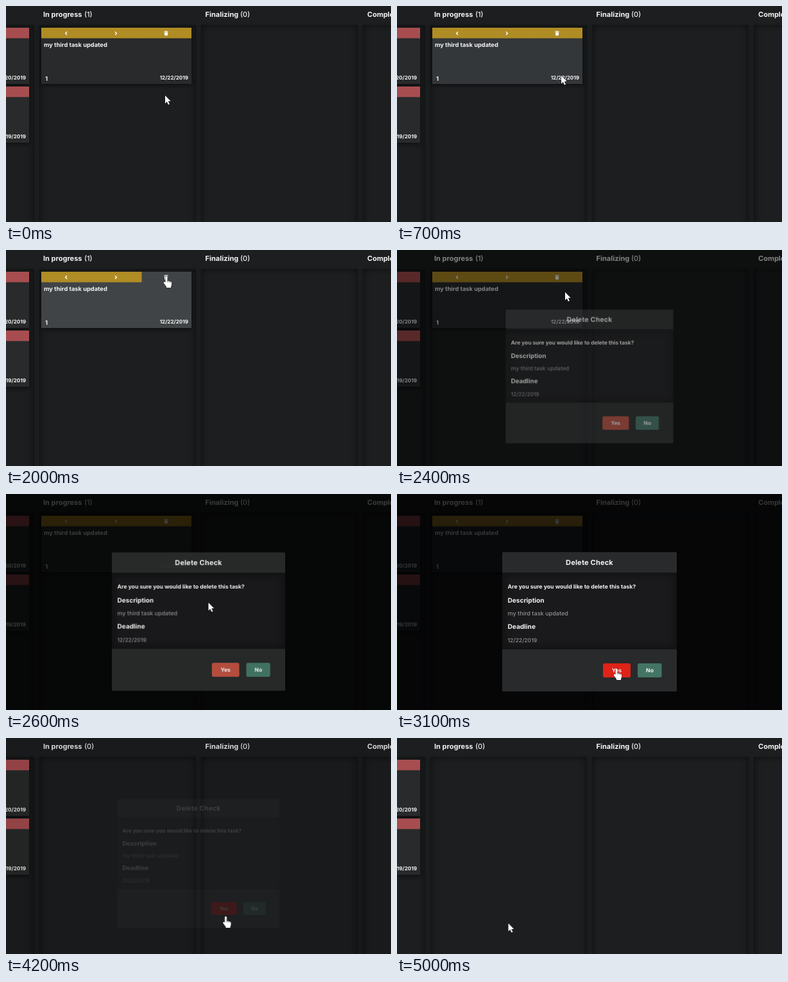
Animation of 600x338 px, one loop 5100 ms. Source, as an HTML page:

```html
<!DOCTYPE html>
<html lang="en">
<head>
<meta charset="utf-8">
<title>Task board</title>
<style>
  html, body { margin: 0; width: 100%; height: 100%; overflow: hidden; background: #1c1e1f; }
  .board { position: relative; width: 100%; height: 100%; overflow: hidden; contain: strict; }
  .column {
    position: absolute; top: 30px; width: 244px; height: 340px;
    background: #1c1e1f;
    box-shadow: inset 0 0 11px rgba(0, 0, 0, .55), 0 0 4px rgba(0, 0, 0, .25);
  }
  .stage { position: absolute; left: 0; top: 0; overflow: hidden; }
  text { font-family: Inter, "Open Sans", sans-serif; font-weight: 700; fill: #f4f4f4; text-rendering: geometricPrecision; }
  .title { font-size: 11px; }
  .title .count { font-weight: 500; }
  .task { font-size: 9.3px; }
  .date { font-size: 8.1px; text-anchor: end; }
  .card { filter: drop-shadow(0 2px 3px rgba(0, 0, 0, .55)); }
  .surface { fill: #282a2b; }
  .gold { fill: #b08c25; }
  .red { fill: #a74d50; }
  .chevron { fill: none; stroke: #fff; stroke-width: 1.3; }
  .icon { fill: #fff; }
  .head { font-size: 11px; letter-spacing: .2px; text-anchor: middle; }
  .ask { font-size: 8.75px; }
  .label { font-size: 10.1px; }
  .value { font-size: 9.1px; font-weight: 500; fill: #909193; }
  .button { font-size: 8.6px; text-anchor: middle; }
  .pointer { fill: #fff; stroke: #111; stroke-width: .8; paint-order: stroke; }

  /* 5.1 s loop on a 0.1 s grid (1.96% per tick) */
  .anim { animation: 5.1s step-end infinite; }
  .cursor { animation-name: move; }
  .hand { animation-name: hand; }
  .arrow { animation-name: arrow; }
  .hover { animation-name: hover; }
  .bin { animation-name: bin; }
  .full { animation-name: full; }
  .empty { animation-name: empty; }
  .modal { animation-name: fade; }
  .dialog { animation-name: zoom; transform-origin: 300px 146px; }
  .yes { animation-name: yes; }

  @keyframes move {
    0% { transform: translate(248px, 140px); }
    11.76% { transform: translate(251px, 130px); }
    13.72% { transform: translate(256px, 109px); }
    15.68% { transform: translate(262px, 82px); }
    17.64% { transform: translate(266px, 60px); }
    19.6% { transform: translate(268px, 49px); }
    21.56% { transform: translate(268.5px, 46px); }
    27.45% { transform: translate(268.5px, 46px); animation-timing-function: steps(6); }
    39.21% { transform: translate(250px, 41px); }
    47.05% { transform: translate(262px, 66px); }
    49.01% { transform: translate(291px, 124px); }
    50.98% { transform: translate(315.5px, 170px); }
    52.94% { transform: translate(323px, 196px); }
    54.9% { transform: translate(330px, 223px); }
    56.86% { transform: translate(335px, 245px); }
    58.82% { transform: translate(339px, 261px); }
    60.78% { transform: translate(342px, 273px); }
    62.74% { transform: translate(344px, 281px); }
    64.7% { transform: translate(345px, 285px); }
    66.66% { transform: translate(345px, 286px); }
    68.62% { transform: translate(343px, 281px); }
    70.58% { transform: translate(342.5px, 277px); }
    82.35% { transform: translate(342.5px, 279px); }
    84.31% { transform: translate(322px, 284px); }
    86.27% { transform: translate(272px, 289px); }
    88.23% { transform: translate(212px, 291px); }
    90.19%, 100% { transform: translate(173.5px, 290px); }
  }
  @keyframes hand {
    0%, 47.05%, 84.31%, 100% { opacity: 0; }
    19.6%, 60.78% { opacity: 1; }
  }
  @keyframes arrow {
    0%, 47.05%, 84.31%, 100% { opacity: 1; }
    19.6%, 60.78% { opacity: 0; }
  }
  @keyframes hover {
    0%, 47.05%, 100% { fill: #282a2b; }
    13.72% { fill: #34373a; }
    15.68% { fill: #404446; }
  }
  @keyframes bin {
    0%, 47.05%, 100% { opacity: 1; }
    19.6% { opacity: 0; }
  }
  @keyframes full {
    0% { opacity: 1; }
    80.39%, 100% { opacity: 0; }
  }
  @keyframes empty {
    0% { opacity: 0; }
    80.39%, 100% { opacity: 1; }
  }
  @keyframes fade {
    0%, 84.31%, 100% { opacity: 0; }
    45.09%, 82.35% { opacity: .15; }
    47.05% { opacity: .6; }
    49.01% { opacity: .9; }
    50.98% { opacity: .98; }
    52.94% { opacity: 1; }
    80.39% { opacity: .55; }
  }
  @keyframes zoom {
    0%, 45.09%, 82.35%, 100% { transform: scale(.93); }
    47.05% { transform: scale(.96); }
    49.01% { transform: scale(.983); }
    50.98% { transform: scale(.993); }
    52.94% { transform: scale(1); }
    80.39% { transform: scale(.965); }
  }
  @keyframes yes {
    0%, 100% { fill: #b94f40; }
    60.78% { fill: #de2318; }
    62.74% { fill: #f00; }
  }
</style>
</head>
<body>
<div class="board">
  <div class="column" style="left:-200px"></div>
  <div class="column" style="left:52px"></div>
  <div class="column" style="left:304px"></div>
  <div class="column" style="left:556px"></div>

  <svg class="stage" width="600" height="338" viewBox="0 0 600 338">
    <defs>
      <g id="icons">
        <path class="chevron" d="M40 6.2 37.6 8.7 40 11.2M115 6.2l2.4 2.5-2.4 2.5"/>
        <path class="icon" d="M191.3 5.6h1.8l.5-.6h1.8l.5.6h1.8v1h-6.4zM191.8 7.2h5.4l-.4 5h-4.6z"/>
      </g>
      <g id="late">
        <path class="surface" d="M0 0h234v88H0z"/>
        <path class="red" d="M0 0h234v16.5H0z"/>
        <use href="#icons"/>
      </g>
    </defs>

    <g class="title">
      <text x="58" y="17">In progress</text>
      <text class="count anim full" x="122" y="17">(1)</text>
      <text class="count anim empty" x="122" y="17">(0)</text>
      <text x="310.5" y="17">Finalizing</text>
      <text class="count" x="365" y="17">(0)</text>
      <text x="563" y="17">Completed</text>
    </g>

    <g class="card" transform="translate(-198 34)">
      <use href="#late"/>
      <text class="date" x="229" y="81">12/20/2019</text>
    </g>
    <g class="card" transform="translate(-198 126)">
      <use href="#late"/>
      <text class="date" x="229" y="81">12/19/2019</text>
    </g>

    <g class="anim full">
      <g class="card" transform="translate(55 34)">
        <path class="surface anim hover" d="M0 0h234v88H0z"/>
        <path class="gold" d="M0 0h156.5v16.5H0z"/>
        <path class="gold anim bin" d="M156 0h78v16.5h-78z"/>
        <use href="#icons"/>
        <text class="task" x="4" y="30">my third task updated</text>
        <text class="task" x="6" y="82.5">1</text>
        <text class="date" x="229" y="81">12/22/2019</text>
      </g>
    </g>

    <g class="anim modal">
      <rect width="600" height="338" fill="#010002" opacity=".78"/>
      <g class="anim dialog">
        <rect x="164" y="91" width="272" height="218" rx="1.5" fill="#282a2b"/>
        <svg x="164" y="123" width="272" height="120">
          <rect width="272" height="120" fill="#1a191b"/>
          <rect width="272" height="120" fill="none" stroke="#000" stroke-opacity=".3" stroke-width="9" style="filter:blur(5px)"/>
        </svg>
        <text class="head" x="300" y="111">Delete Check</text>
        <text class="ask" x="172.5" y="148">Are you sure you would like to delete this task?</text>
        <text class="label" x="172.5" y="169.5">Description</text>
        <text class="value" x="172.5" y="190">my third task updated</text>
        <text class="label" x="172.5" y="211.3">Deadline</text>
        <text class="value" x="172.5" y="232" style="font-size:8.6px">12/22/2019</text>
        <rect class="anim yes" x="321" y="265" width="43" height="22" rx="2.5"/>
        <rect x="375" y="265" width="37.5" height="22" rx="2.5" fill="#437464"/>
        <text class="button" x="342.5" y="279.2">Yes</text>
        <text class="button" x="394" y="279.2">No</text>
      </g>
    </g>

    <g class="anim cursor">
      <path class="pointer anim arrow" d="M0 0v12.4l2.8-2.6 2.1 4.7 2-.9-2.1-4.5h3.9z"/>
      <g class="anim hand">
        <path class="pointer" d="M-1.5 1.5a1.5 1.5 0 0 1 3 0V7l5 1.2q1.6 .5 1.6 2.4v2q0 2-1 3.5V18H0v-1.5L-4 11q-.8-1.6.6-2.2 1-.3 1.9 1z"/>
        <path d="M1.6 6.5v3M4 7.6v2.2M6.2 8.2V10" stroke="#222" stroke-width=".6"/>
      </g>
    </g>
  </svg>
</div>
</body>
</html>
```
